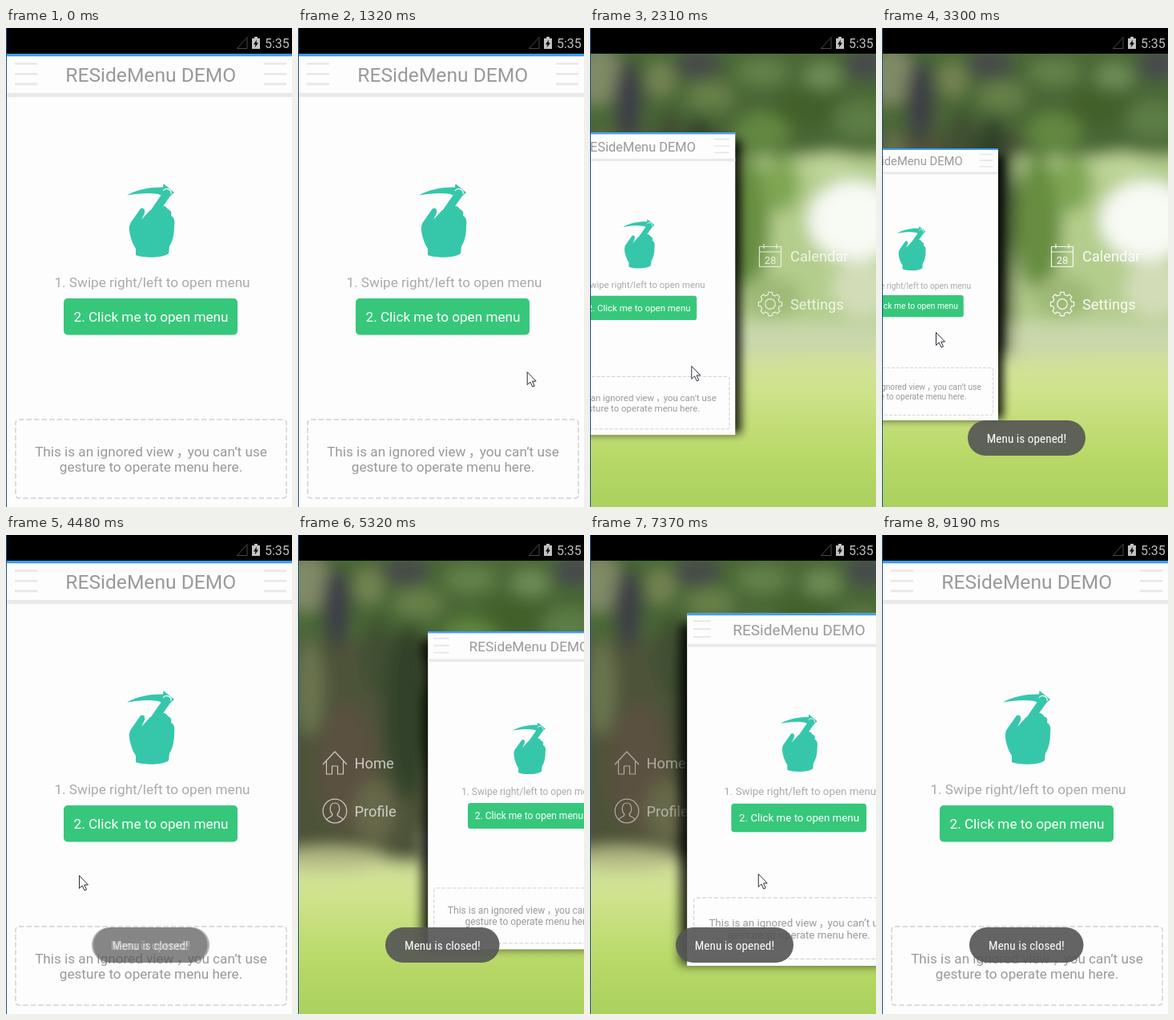
Animation, 357 px wide and 597 px high, one loop 9290 ms. Source, as an HTML page:

```html
<!DOCTYPE html>
<html lang="en">
<head>
<meta charset="utf-8">
<title>Side menu demo</title>
<style>
  html, body { margin: 0; width: 100%; height: 100%; overflow: hidden; background: #000; }
  svg { position: absolute; left: 0; top: 0; width: 357px; height: 597px; display: block; }
  #photo { will-change: transform; }
  text { font-family: Roboto, "Noto Sans CJK SC", "Noto Sans CJK", sans-serif; }
  .mid { text-anchor: middle; }
  .body { font-size: 17.15px; }
  .item { font-size: 18.3px; fill: #fff; }
  .line { fill: none; stroke: #fff; stroke-width: 1.2; stroke-linejoin: round; }
  .toast rect { fill: #555; fill-opacity: .91; }
  .toast text { font-family: "Roboto Condensed", Roboto, sans-serif; font-stretch: 75%; font-size: 15.3px; fill: #fff; }
</style>
</head>
<body>
<svg id="photo" viewBox="0 0 357 597">
  <defs>
    <linearGradient id="grass" x1="0" y1="0" x2="0" y2="1">
      <stop offset="0" stop-color="#d2dfa0"/>
      <stop offset=".2" stop-color="#cfe38c"/>
      <stop offset=".5" stop-color="#b9d968"/>
      <stop offset="1" stop-color="#9cc954"/>
    </linearGradient>
    <filter id="soft" x="-20%" y="-20%" width="140%" height="140%"><feGaussianBlur stdDeviation="10"/></filter>
  </defs>
  <rect width="357" height="597" fill="#5b7a40"/>
  <g filter="url(#soft)">
    <rect x="-40" y="-20" width="440" height="190" fill="#4a6836"/>
    <rect x="-40" y="130" width="215" height="300" fill="#4d5237"/>
    <rect x="165" y="160" width="240" height="260" fill="#b4cd8c"/>

    <ellipse cx="10" cy="60" rx="30" ry="36" fill="#808a66"/>
    <ellipse cx="48" cy="90" rx="18" ry="50" fill="#3e3d45"/>
    <ellipse cx="88" cy="64" rx="18" ry="22" fill="#748453"/>
    <ellipse cx="135" cy="45" rx="30" ry="18" fill="#46484a"/>
    <ellipse cx="150" cy="85" rx="30" ry="18" fill="#67804a"/>
    <ellipse cx="215" cy="55" rx="32" ry="16" fill="#638349"/>
    <ellipse cx="270" cy="100" rx="44" ry="26" fill="#42612c"/>
    <ellipse cx="290" cy="60" rx="24" ry="16" fill="#6e8d55"/>
    <ellipse cx="345" cy="45" rx="28" ry="20" fill="#474a4c"/>
    <ellipse cx="338" cy="115" rx="34" ry="24" fill="#5c7d44"/>
    <ellipse cx="215" cy="130" rx="34" ry="24" fill="#62883f"/>

    <ellipse cx="14" cy="190" rx="18" ry="60" fill="#6b7550"/>
    <ellipse cx="100" cy="150" rx="20" ry="50" fill="#405032"/>
    <ellipse cx="138" cy="220" rx="30" ry="110" fill="#33432b"/>
    <ellipse cx="60" cy="290" rx="38" ry="80" fill="#5a5140"/>
    <ellipse cx="95" cy="345" rx="26" ry="40" fill="#666748"/>

    <ellipse cx="195" cy="245" rx="30" ry="85" fill="#668d3f"/>
    <ellipse cx="238" cy="195" rx="24" ry="34" fill="#7fa653"/>
    <ellipse cx="300" cy="172" rx="36" ry="16" fill="#bfd59a"/>
    <ellipse cx="330" cy="240" rx="58" ry="50" fill="#f8faf4"/>
    <ellipse cx="340" cy="325" rx="38" ry="36" fill="#d2ddb8"/>
    <ellipse cx="225" cy="335" rx="40" ry="26" fill="#9fb977"/>
    <rect x="160" y="368" width="240" height="40" fill="#c9d7ab"/>

    <path d="M-40 402C40 392 70 404 120 408S190 403 400 406V660H-40Z" fill="url(#grass)"/>
    <ellipse cx="40" cy="404" rx="70" ry="14" fill="#b7bc86"/>
  </g>
</svg>

<svg id="stage" viewBox="0 0 357 597">
  <defs>
    <filter id="blur" x="-10%" y="-10%" width="120%" height="120%"><feGaussianBlur stdDeviation="9"/></filter>
    <path id="bars" d="M0 0H28M0 12.7H28M0 25.4H28" stroke="#e7e7e7" stroke-width="2.6"/>
  </defs>

  <g id="left">
    <path class="line" d="M31 286L46 270L61 286M35.500 282V298H42.500V288H49.500V298H56.500V282"/>
    <text class="item" x="70.500" y="291">Home</text>
    <circle class="line" cx="46" cy="344" r="14.800"/>
    <path class="line" d="M36 355C37 351 43 352 43 348C39 344 39 334 46 334S53 344 49 348C49 352 55 351 56 355"/>
    <text class="item" x="70.500" y="351">Profile</text>
  </g>
  <g id="right">
    <path class="line" d="M211.500 272.500H238.500V297.500H211.500ZM211.500 279H238.500M217 269V275M233 269V275"/>
    <text class="item mid" x="225" y="293.500" style="font-size:13px">28</text>
    <text class="item" x="250" y="291">Calendar</text>
    <path class="line" id="gear"/>
    <circle class="line" cx="225" cy="344" r="6.300"/>
    <text class="item" x="250" y="351">Settings</text>
  </g>

  <g id="card">
    <rect x="-10" y="48" width="382" height="546" fill="#000" opacity=".85" filter="url(#blur)"/>
    <rect x="1" y="32" width="360" height="565" fill="#fdfdfd"/>
    <rect x="1" y="32" width="360" height="3.300" fill="#3c9bf0"/>
    <rect x="1" y="81" width="360" height="5" fill="#e9e9e9"/>
    <use href="#bars" x="11" y="44.500"/>
    <use href="#bars" x="322" y="44.500"/>
    <text class="mid" x="180.700" y="67" font-size="24.600" fill="#999">RESideMenu DEMO</text>

    <g fill="#36c7ab">
      <path d="M151 208.500C164 201 181 198 196 198.500L196.500 194L210 205L202 212L190 207C178 205 166 206 151 208.500Z"/>
      <path d="M202 205L186 228" stroke="#36c7ab" stroke-width="10" stroke-linecap="round"/>
      <path d="M159 270C154 258 152 248 156 242L168 225C172 223 175 227 172 233L169 239L180 227L190 222C196 221 201 222 202 226C206 227 207 230 206 234C210 236 211 240 210 247C210 258 208 266 204 272L203 281C195 287 172 287 162 283L162 275Z"/>
      <path d="M196 203A5.500 5.500 0 0 1 206 207" fill="none" stroke="#fff" stroke-width="1.200"/>
    </g>

    <text class="mid body" x="182.500" y="323" fill="#aaa">1. Swipe right/left to open menu</text>
    <rect x="72" y="337" width="217" height="45.500" rx="5" fill="#36c77b"/>
    <text class="mid body" x="181" y="366" fill="#fff">2. Click me to open menu</text>
    <rect x="12" y="488" width="338" height="98" rx="4" fill="none" stroke="#d2d2d2" stroke-width="1.500" stroke-dasharray="6.500 3"/>
    <g class="mid body" fill="#999">
      <text x="181" y="534">This is an ignored view<tspan dx="3">，</tspan><tspan dx="-3">you can’t use</tspan></text>
      <text x="181" y="553">gesture to operate menu here.</text>
    </g>
  </g>

  <rect width="357" height="32"/>
  <path d="M288.500 25.500H301V11.500Z" fill="none" stroke="#484848"/>
  <path d="M307 13H310V11H314V13H317V26H307Z" fill="#c4c4c4"/>
  <path d="M313 14.500L309 20.500H311.500L310.500 24.500L315 18.500H312.500Z"/>
  <text x="323" y="25" font-size="16" fill="#bdbdbd">5:35</text>

  <g id="opened" class="toast">
    <rect x="107" y="489" width="147" height="44" rx="22"/>
    <text class="mid" x="180.500" y="517">Menu is opened!</text>
  </g>
  <g id="closed" class="toast">
    <rect x="109" y="489" width="142.500" height="44" rx="22"/>
    <text class="mid" x="180.500" y="517">Menu is closed!</text>
  </g>
  <path id="cursor" d="M.5 .5V16.500L4.200 13L7 19L9.500 18L6.800 12H11.500Z" fill="#fff" stroke="#2a2c38"/>
  <rect width="1" height="597" fill="#1f4f80"/>
</svg>

<script>
  const LOOP = 9290, HOME_Y = 327;
  const $ = id => document.getElementById(id);

  // Card scale over time: [ms, scale, eased]
  const scaleKeys = [
    [1380, 1], [1480, .96], [1780, .81], [2360, .654], [2560, .6],
    [3600, .6], [3900, 1, true], [4700, 1], [5200, .83], [5320, .702],
    [5550, .6], [6790, .6], [7370, .777], [7490, .84], [7730, .84], [7970, 1, true]
  ];
  // Pointer visits: [ms, x, y]
  const visits = [
    [[500, 300, 600], [1300, 286, 428], [1440, 284, 429], [1780, 195, 431], [2360, 120, 420],
     [3300, 67, 379], [3600, 67, 379], [4480, 91, 424], [4700, 91, 424], [5200, 290, 430], [5300, 360, 430]],
    [[6080, 360, 404], [6200, 325, 406], [6550, 295, 410], [6790, 295, 410], [7370, 210, 422],
     [7490, 180, 423], [8150, 180, 423], [8510, 150, 600]]
  ];

  const clamp = v => Math.max(0, Math.min(1, v));
  const ramp = (t, from, length) => clamp((t - from) / length);

  function track(keys, t, col = 1) {
    const i = keys.findIndex(k => k[0] > t);
    if (i === 0) return keys[0][col];
    if (i < 0) return keys[keys.length - 1][col];
    const a = keys[i - 1], b = keys[i];
    let p = (t - a[0]) / (b[0] - a[0]);
    if (b[2] === true) p = (1 - Math.cos(Math.PI * p)) / 2;
    return a[col] + (b[col] - a[col]) * p;
  }

  function gearPath(cx, cy, teeth = 8) {
    const pts = [];
    for (let i = 0; i < teeth; i++) {
      [[-.3, 11.8], [-.2, 14.8], [.2, 14.8], [.3, 11.8]].forEach(([da, r]) => {
        const a = (i + da) * 2 * Math.PI / teeth;
        pts.push((cx + r * Math.cos(a)).toFixed(1) + ' ' + (cy + r * Math.sin(a)).toFixed(1));
      });
    }
    return 'M' + pts.join('L') + 'Z';
  }

  function draw(t) {
    const s = track(scaleKeys, t);
    const rightSide = t < 4600;
    const px = rightSide ? -179 : 541;
    $('card').setAttribute('transform',
      `translate(${px * (1 - s)} ${HOME_Y * (1 - s)}) scale(${s})`);

    const alpha = clamp((1 - s) * 2.3);
    $('left').setAttribute('opacity', rightSide ? 0 : alpha);
    $('right').setAttribute('opacity', rightSide ? alpha : 0);

    const swap1 = ramp(t, 4370, 220), swap2 = ramp(t, 6200, 300), swap3 = ramp(t, 8150, 300);
    $('opened').setAttribute('opacity', ramp(t, 2420, 240) - swap1 + swap2 - swap3);
    $('closed').setAttribute('opacity', swap1 - swap2 + swap3);

    const visit = visits.find(v => t >= v[0][0] && t < v[v.length - 1][0]);
    $('cursor').setAttribute('visibility', visit ? 'visible' : 'hidden');
    if (visit) {
      $('cursor').setAttribute('transform', `translate(${track(visit, t)} ${track(visit, t, 2)})`);
    }
  }

  $('gear').setAttribute('d', gearPath(225, 344));
  const start = performance.now();
  function tick() {
    draw((performance.now() - start) % LOOP);
    requestAnimationFrame(tick);
  }
  tick();
</script>
</body>
</html>
```
